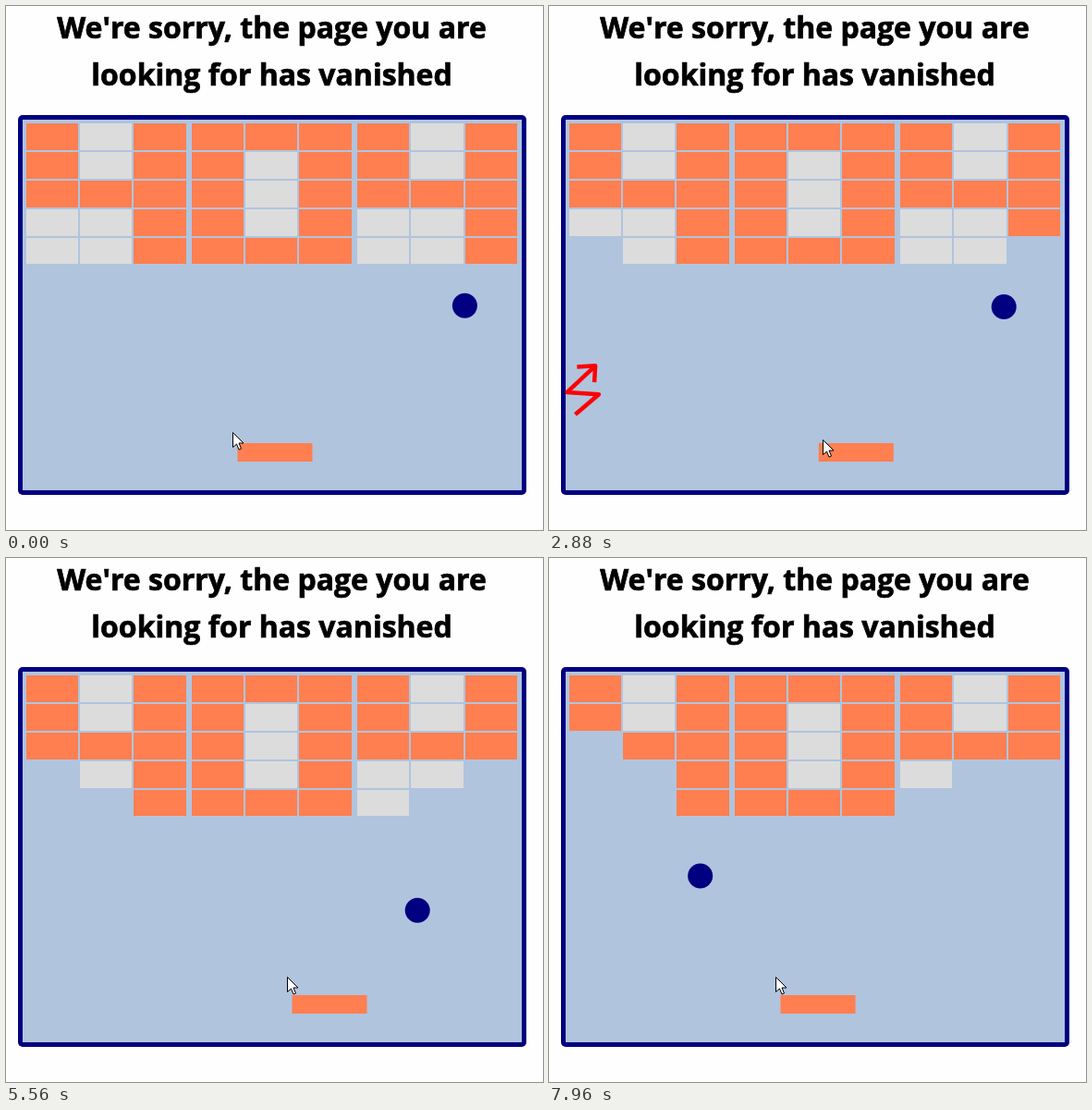
Recreate the animation shown at these times as an HTML page with a canvas. Size 581 px wide and 567 px high, loop 7990 ms.

```html
<!DOCTYPE html>
<html lang="en">
<head>
<meta charset="utf-8">
<title>404</title>
<style>
  html, body { margin: 0; width: 100%; height: 100%; overflow: hidden; background: #fefefe; }
  canvas { display: block; }
</style>
</head>
<body>
<canvas id="stage" width="581" height="567"></canvas>
<script>
const ctx = document.getElementById('stage').getContext('2d');
const LOOP = 7990;
const CORAL = '#ff7f50', GREY = '#dcdcdc', SKY = '#b0c4de', NAVY = '#000080';
const RADIUS = 13.5, SLOPE = 1.528, STEP = 0.25;
const CENTER_X = 290.25, REACH_X = 256.25, PADDLE_TOP = 473;

const digits = {
  4: ['#.#', '#.#', '###', '..#', '..#'],
  0: ['###', '#.#', '#.#', '#.#', '###']
};

const bricks = [4, 0, 4].flatMap((digit, d) => digits[digit].flatMap((line, row) =>
  [...line].map((cell, col) => {
    const x = 22 + d * 179.1 + col * 58.15, y = 127 + row * 30.9;
    return {
      left: Math.round(x), right: Math.round(x + 56.2),
      top: Math.round(y), bottom: Math.round(y + 28.8),
      color: cell === '#' ? CORAL : GREY, brokenAt: Infinity
    };
  })));

// Vertical distance the ball has covered; it picks up speed once
const travel = t => 0.188 * t + 0.086 * Math.max(0, t - 1400);

// Play the whole game once, keeping the ball's trail
const trail = [], bolts = [];
function play() {
  const ball = { x: 496, y: 324.5, dx: SLOPE, dy: -1 };
  const breaksBrick = distance => {
    const hit = bricks.find(b => b.brokenAt === Infinity &&
      ball.x + RADIUS > b.left && ball.x - RADIUS < b.right &&
      ball.y + RADIUS > b.top && ball.y - RADIUS < b.bottom);
    if (!hit) return false;
    hit.brokenAt = distance;
    const inCorner = Math.abs(ball.x - CENTER_X) > REACH_X - 6;
    if (inCorner) bolts.push({ x: ball.x, y: ball.y, distance });
    return true;
  };
  for (let distance = 0; distance <= travel(LOOP) + STEP; distance += STEP) {
    trail.push([ball.x, ball.y]);
    ball.x += ball.dx * STEP;
    const offset = ball.x - CENTER_X;
    if (Math.abs(offset) > REACH_X) ball.dx = -Math.sign(offset) * SLOPE;
    if (breaksBrick(distance)) ball.dx *= -1;
    ball.y += ball.dy * STEP;
    if (ball.y + RADIUS > PADDLE_TOP) ball.dy = -1;
    if (breaksBrick(distance)) ball.dy *= -1;
  }
}

function smoothstep(k) {
  k = Math.min(1, Math.max(0, k));
  return k * k * (3 - 2 * k);
}

// The pointer swings between a left and a right resting place
function pointerX(t) {
  const swing = [2650, 3477, 4900, 6937].reduce(
    (sum, start, i) => sum + (i % 2 ? -1 : 1) * smoothstep((t - start) / 300), 0);
  return 246 + 59 * swing;
}
const pointerY = t => 467 - t / 600 + 7 * Math.sin((t - 1200) / 1100);

function rect(x, y, w, h, color) {
  ctx.fillStyle = color;
  ctx.fillRect(x, y, w, h);
}

function trace(points) {
  points.forEach(([x, y], i) => i ? ctx.lineTo(x, y) : ctx.moveTo(x, y));
}

function drawTitle() {
  ctx.fillStyle = ctx.strokeStyle = '#000';
  ctx.lineWidth = 0.7;
  ctx.font = '700 32px "Open Sans", "Noto Sans", sans-serif';
  ctx.textAlign = 'center';
  ['We′re sorry, the page you are', 'looking for has vanished'].forEach((line, i) => {
    ctx.fillText(line, 287.5, 35 + i * 51);
    ctx.strokeText(line, 287.5, 35 + i * 51);
  });
}

function drawBoard() {
  ctx.fillStyle = NAVY;
  ctx.beginPath();
  ctx.roundRect(13, 118, 550, 411, 5);
  ctx.fill();
  rect(18, 123, 540, 401, SKY);
}

function drawBricks(distance) {
  bricks.filter(b => distance < b.brokenAt).forEach(b =>
    rect(b.left, b.top, b.right - b.left, b.bottom - b.top, b.color));
}

function drawBolt(bolt, t) {
  const age = t - bolt.time;
  if (age < 0 || age > 1400) return;
  ctx.save();
  ctx.translate(bolt.x, bolt.y + age * 0.109);
  ctx.rotate((age - 870) * 0.169 * Math.PI / 180);
  ctx.strokeStyle = '#f00';
  ctx.lineWidth = 4.5;
  ctx.lineJoin = 'round';
  ctx.beginPath();
  trace([[-18.5, -13], [-4, -26.5], [6.5, -12]]);
  trace([[-4, -26.5], [-9.5, 15], [18.5, -5], [12.5, 28]]);
  ctx.stroke();
  ctx.restore();
}

function drawBall([x, y]) {
  ctx.fillStyle = NAVY;
  ctx.beginPath();
  ctx.arc(x, y, RADIUS, 0, Math.PI * 2);
  ctx.fill();
}

function drawPointer(x, y) {
  ctx.save();
  ctx.translate(Math.round(x) - 0.5, Math.round(y) + 0.5);
  ctx.beginPath();
  trace([[0, 0], [0, 16], [4, 12.5], [6.5, 18.5], [9, 17.5], [6.5, 11.5], [11.5, 11.5]]);
  ctx.closePath();
  ctx.fillStyle = '#fff';
  ctx.fill();
  ctx.strokeStyle = '#000';
  ctx.lineWidth = 1;
  ctx.stroke();
  ctx.restore();
}

function draw(t) {
  const distance = travel(t);
  rect(0, 0, 581, 567, '#fefefe');
  drawTitle();
  drawBoard();
  drawBricks(distance);
  // The paddle trails the pointer slightly
  rect(pointerX(t - 40) + 4.5, PADDLE_TOP, 81, 20, CORAL);
  drawBall(trail[Math.round(distance / STEP)]);
  bolts.forEach(bolt => drawBolt(bolt, t));
  drawPointer(pointerX(t), pointerY(t));
}

play();
for (const bolt of bolts) {
  bolt.time = 0;
  while (travel(bolt.time) < bolt.distance) bolt.time++;
}
const begin = performance.now();
function tick() {
  draw((performance.now() - begin) % LOOP);
  requestAnimationFrame(tick);
}
tick();
</script>
</body>
</html>
```
